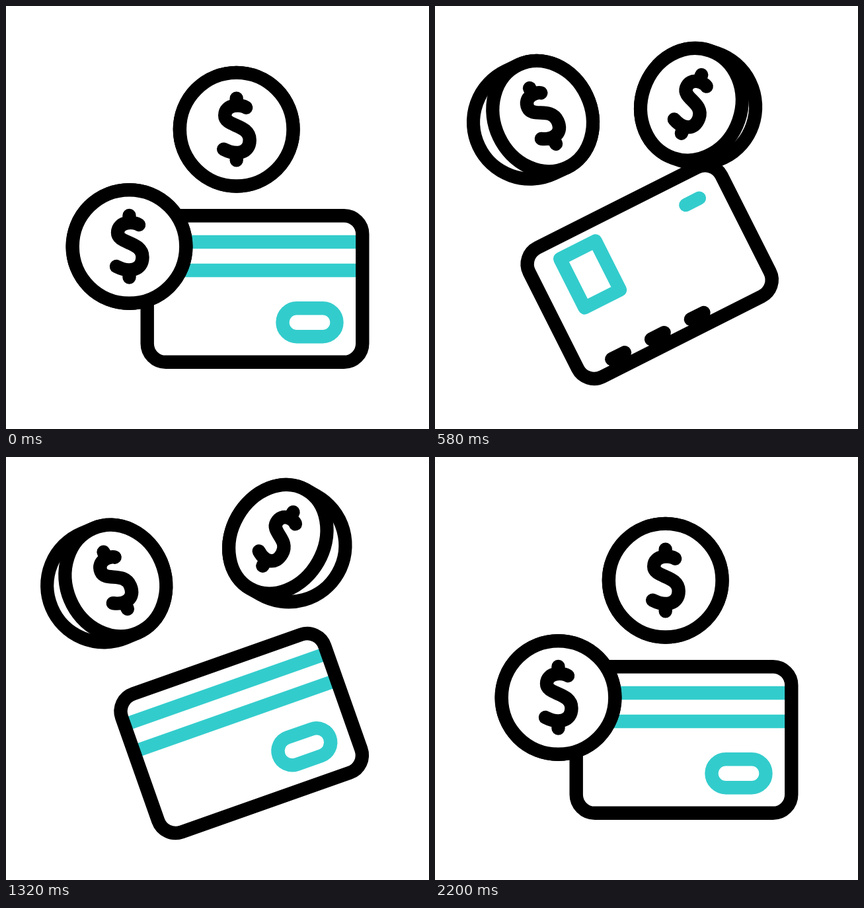
These frames come from a looping animation (640x640 px, 3.6 s). An HTML page with a canvas:

```html
<!DOCTYPE html>
<html lang="en">
<head>
<meta charset="utf-8">
<title>Card and coins</title>
<style>
  html, body { margin: 0; width: 100%; height: 100%; overflow: hidden; background: #fff; }
  canvas { display: block; width: 640px; height: 640px; }
</style>
</head>
<body>
<canvas id="stage" width="640" height="640"></canvas>
<script>
const ctx = document.getElementById('stage').getContext('2d');
const LOOP = 3600, STEP = 20, LINE = 20.4;
const BLACK = '#000', TEAL = '#33cccc', WHITE = '#fff';
const RAD = Math.PI / 180;

// Smooth curve through [time, value] keys, flat at every peak and at both ends
function curve(keys) {
  const slope = i => (keys[i + 1][1] - keys[i][1]) / (keys[i + 1][0] - keys[i][0]);
  const tangents = keys.map((_, i) => {
    if (i === 0 || i === keys.length - 1) return 0;
    const a = slope(i - 1), b = slope(i);
    return a * b > 0 ? 2 * a * b / (a + b) : 0;
  });
  return t => {
    if (t <= keys[0][0]) return keys[0][1];
    const i = keys.findIndex(k => k[0] > t) - 1;
    if (i < 0) return keys[keys.length - 1][1];
    const [t0, v0] = keys[i], [t1, v1] = keys[i + 1];
    const w = t1 - t0, u = (t - t0) / w, n = 1 - u;
    return v0 * n * n * (1 + 2 * u) + v1 * u * u * (3 - 2 * u)
      + w * u * n * (n * tangents[i] - u * tangents[i + 1]);
  };
}

const coins = [
  { x: 348.7, y: 186.7, dx: 81.5, dy: -55, depth: -19.3, squash: 16.3, turn: 30.5,
    lift: curve([[160, 0], [360, .13], [540, .555], [820, .905], [1160, 1],
      [1320, .968], [1640, .75], [1920, .3], [2200, 0]]) },
  { x: 186.5, y: 364, dx: -48, dy: -212, depth: 24, squash: 14, turn: -28.5,
    lift: curve([[0, 0], [180, .15], [360, .547], [540, .86], [820, .99], [920, 1],
      [1140, .95], [1320, .8], [1640, .32], [2060, 0]]) }
];

const card = {
  x: 376.5, y: 428, dx: -52, dy: -25.5,
  shift: curve([[0, 0], [360, .72], [600, 1], [820, .98], [1140, .72], [1320, .39], [1640, 0]]),
  flip: curve([[0, 1], [610, -1], [1170, 1]]),
  turn: curve([[0, 0], [615, -27], [960, 21], [1420, -25], [1890, 0]])
};

function stroke(color, cap = 'round') {
  ctx.strokeStyle = color;
  ctx.lineCap = cap;
  ctx.stroke();
}

// Builds a path in a scaled space, so that the stroke keeps an even width
function shape(sx, sy, build) {
  ctx.save();
  ctx.scale(sx, sy);
  ctx.beginPath();
  build();
  ctx.restore();
}

function line(x0, y0, x1, y1) {
  ctx.moveTo(x0, y0);
  ctx.lineTo(x1, y1);
}

function dollar() {
  ctx.moveTo(14.5, -33);
  ctx.bezierCurveTo(8, -38, -17.5, -39, -17.5, -21);
  ctx.bezierCurveTo(-17.5, -4, 20, -8, 20, 16);
  ctx.bezierCurveTo(20, 36, 0, 40, -19.5, 30);
  line(0, -47, 0, -36);
  line(0, 36, 0, 46.5);
}

function drawCoin(c, t) {
  const p = c.lift(t), r = 85.8;
  const d = c.depth * p, rx = r - c.squash * p, side = Math.sign(c.depth);
  ctx.save();
  ctx.translate(c.x + c.dx * p, c.y + c.dy * p);
  ctx.rotate(c.turn * p * RAD);
  ctx.fillStyle = WHITE;

  // Back rim, joined to the front face
  ctx.save();
  ctx.scale(side, 1);
  ctx.beginPath();
  ctx.arc(0, 0, r, Math.PI / 2, Math.PI * 1.5);
  ctx.ellipse(Math.abs(d), 0, rx, r, 0, -Math.PI / 2, Math.PI / 2);
  ctx.closePath();
  ctx.fill();
  stroke(BLACK);
  ctx.restore();

  ctx.translate(d, 0);
  ctx.beginPath();
  ctx.ellipse(0, 0, rx, r, 0, 0, Math.PI * 2);
  ctx.fill();
  stroke(BLACK);
  shape(rx / r, 1, dollar);
  stroke(BLACK);
  ctx.restore();
}

function drawStripes(s) {
  shape(1, s, () => [-71, -28].forEach(y => line(-162, y, 162, y)));
  stroke(TEAL, 'butt');
  shape(1, s, () => ctx.roundRect(42, 29.2, 82, 43, 21.5));
  stroke(TEAL);
}

function drawChip(s) {
  shape(1, s, () => ctx.rect(-112, -80, 60, 84));
  stroke(TEAL);
  shape(1, s, () => line(94.5, -67, 117.5, -67));
  stroke(TEAL);
  shape(1, s, () => [-99.5, -32.5, 34.5].forEach(x => line(x - 11, 93, x + 11, 93)));
  stroke(BLACK);
}

function drawCard(t) {
  const p = card.shift(t), flip = card.flip(t), s = Math.max(Math.abs(flip), .01);
  const edge = () => shape(1, s, () => ctx.roundRect(-162.8, -110.8, 325.6, 221.6, 28));
  ctx.save();
  ctx.translate(card.x + card.dx * p, card.y + card.dy * p);
  ctx.rotate(card.turn(t) * RAD);
  edge();
  ctx.fillStyle = WHITE;
  ctx.fill();
  ctx.save();
  ctx.clip();
  (flip > 0 ? drawStripes : drawChip)(s);
  ctx.restore();
  edge();
  stroke(BLACK);
  ctx.restore();
}

function draw(t) {
  ctx.fillStyle = WHITE;
  ctx.fillRect(0, 0, 640, 640);
  ctx.lineWidth = LINE;
  ctx.lineJoin = 'round';
  drawCard(t);
  coins.forEach(c => drawCoin(c, t));
}

const start = performance.now();
function tick() {
  const t = (performance.now() - start) % LOOP;
  draw(Math.floor(t / STEP) * STEP);
  requestAnimationFrame(tick);
}
tick();
</script>
</body>
</html>
```
